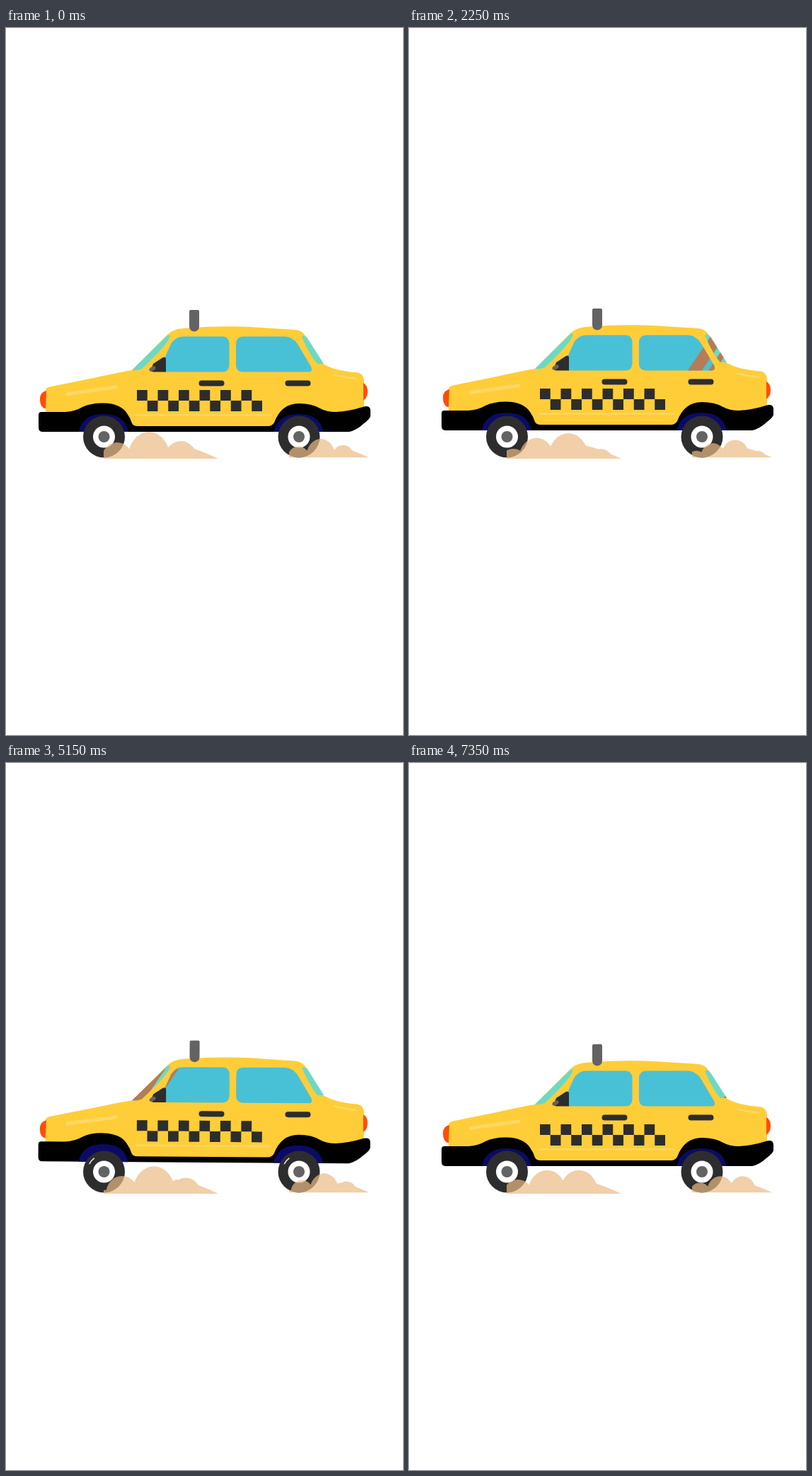
An HTML page for the animation above (7400 ms loop, 561 by 998 pixels).

```html
<!DOCTYPE html>
<html lang="en">
<head>
<meta charset="utf-8">
<title>Taxi</title>
<style>
  html, body { margin: 0; width: 100%; height: 100%; overflow: hidden; background: #fff; }
  svg { display: block; width: 100%; height: 100%; }
</style>
</head>
<body>
<svg viewBox="0 0 561 998">
  <defs>
    <path id="front" d="M178 483L227 435Q233 431 231 437Q226 449 192 481Q185 484 178 483Z"/>
    <path id="back" d="M418 436Q422 432 426 438L449 474L440 474Q430 463 418 436Z"/>
    <path id="panes" d="M250 435.500H306Q315.500 436 315.500 446V476Q315 485.500 306 485.500H224Q218 485 221 473L233 446Q239 436 250 435.500Z
      M335 435.500H394Q405 436 412 446L431 478Q434 485.500 428 485.500H335Q325 485 325 476V446Q325 436 335 435.500Z"/>
    <clipPath id="glass"><use href="#front"/><use href="#back"/><use href="#panes"/></clipPath>
    <g id="wheel">
      <circle r="29.500" fill="#2d2d2d"/>
      <circle r="15.500" fill="#fff"/>
      <circle r="8" fill="#636363"/>
    </g>
    <path id="arch" d="M103 570Q108 545 138 545Q168 545 173 570Z" fill="#0b0b66"/>
    <clipPath id="ground"><path d="M138 500H320V608H138Z"/></clipPath>
  </defs>

  <g id="car">
    <path fill="#ffcd38" d="M56 511Q57 507.500 62 506.500L124 494Q160 486 178 483L228 433Q236 425 250 424Q300 420 345 422L409 426Q419 427 424 436L448 474Q464 484 497 486.500Q505 488 506 498V550H440V566H110V550H56Z"/>
    <g fill="none" stroke="#ffd764" stroke-linecap="round">
      <path stroke-width="5" d="M87 516.500L155 507"/>
      <path stroke-width="2.500" d="M184 546.500H374"/>
      <path stroke-width="2.500" d="M464 489.500Q478 493 495 495"/>
    </g>
    <path fill="#ff4d05" d="M57 512Q48 514 48 524Q48 536 56 537.500ZM505 501Q511 504 511 513Q511 522 505 526Z"/>
    <path d="M46 546Q46 542 50 542H84Q98 541 108 535Q121 529 138 529.500Q162 530 171 544Q176 551 178 558Q180 562 186 562H370Q376 562 379 557Q389 530 414 530Q432 530 444 537Q453 542 466 542Q485 541 504 535Q514 532 515 539V548Q514 552 506 558Q495 568 485 570H52Q46 570 46 564Z"/>
    <use href="#arch"/>
    <use href="#arch" x="275.500"/>
    <use href="#front" fill="#6bd9c6"/>
    <use href="#back" fill="#6bd9c6"/>
    <use href="#panes" fill="#48c1d7"/>
    <g clip-path="url(#glass)">
      <path id="shine" fill="#b57c58" d="M0 432H20L-20 492H-40ZM29 432H38.500L-1.500 492H-11Z"/>
    </g>
    <path fill="#2d2d2d" d="M205 482L208 474L221 465.500Q226 463 226 468V485.500H208Q204 485 205 482Z"/>
    <ellipse cx="207" cy="481" rx="5" ry="2.800" fill="#636363" transform="rotate(-30 207 481)"/>
    <path id="checks" fill="#2d2d2d"/>
    <path stroke="#2d2d2d" stroke-width="8" stroke-linecap="round" d="M276.500 501.500H304.500M398.500 501.500H426.500"/>
    <path fill="#636363" d="M259 400Q259 398 261 398H271Q273 398 273 400V421Q273 428 266 428.500Q259 428 259 421Z"/>
  </g>

  <use href="#wheel" x="138.500" y="577"/>
  <use href="#wheel" x="414" y="577"/>
  <path id="glint" fill="none" stroke="#e4e4e4" stroke-width="1.600" stroke-linecap="round"/>
  <g fill="#eabb85" fill-opacity=".7">
    <g clip-path="url(#ground)"><path class="dust"/></g>
    <g transform="translate(400 606.500) scale(.7) translate(-138 -608)">
      <g clip-path="url(#ground)"><path class="dust"/></g>
    </g>
  </g>
</svg>
<script>
const LOOP = 7400, STEP = 70, CYCLE = 53 / 3, BOB = CYCLE / 2;
const $ = id => document.getElementById(id);
const dust = document.querySelectorAll('.dust');
const smooth = x => { x = Math.min(1, Math.max(0, x)); return x * x * (3 - 2 * x); };

let cells = '';
for (let i = 0; i < 12; i++) cells += `M${185 + i * 14.75} ${511 + i % 2 * 15}h14.750v15h-14.750z`;
$('checks').setAttribute('d', cells);

// Linear interpolation through [x, y] points
function curve(points, x) {
  let i = 1;
  while (i < points.length - 1 && x > points[i][0]) i++;
  const [x0, y0] = points[i - 1], [x1, y1] = points[i];
  return y0 + (y1 - y0) * (x - x0) / (x1 - x0);
}

const PUFF = [[-1, 0], [-.7, 10], [0, 23], [.3, 27], [.8, 32], [1, 38], [1.2, 39], [1.5, 36], [1.87, 33], [2, 25], [2.3, 20], [3, 0]];

function dustPath(u) {
  const shift = u ** 1.4;
  let d = 'M205 608L240 588Q262 590 300 608Z';
  for (let k = -1; k < 3; k++) {
    const s = k + shift, h = Math.max(.1, curve(PUFF, s));
    const x = 157 + s * (s < 0 ? 20 : 45), r = 9 + h * .55;
    d += `M${x - r} 608A${r} ${h} 0 0 1 ${x + r} 608Z`;
  }
  return d;
}

function arc(cx, from, to) {
  const at = deg => {
    const a = deg * Math.PI / 180;
    return `${cx + 23.5 * Math.cos(a)} ${577 + 23.5 * Math.sin(a)}`;
  };
  return `M${at(from)}A23.500 23.500 0 ${to - from > 180 ? 1 : 0} 1 ${at(to)}`;
}

const HEAD = [[1.8, 212], [2.33, 233], [3.33, 272], [4, 370], [7.67, 650], [11, 930]];
const SPAN = [[1.8, 2], [2.33, 24], [3.33, 42], [4, 58], [7.67, 125], [11, 2]];

function glints(p) {
  if (p < 1.8 || p > 11) return '';
  const head = curve(HEAD, p), tail = head - curve(SPAN, p);
  let d = '';
  for (const cx of [138.5, 414]) {
    d += arc(cx, tail, head);
    if (p > 5) d += arc(cx, tail + 180, head + 180);
  }
  return d;
}

function draw(now) {
  const t = now % LOOP;
  const frame = Math.floor(Math.floor(t / 50) * 50 / STEP);
  const p = frame % CYCLE, q = frame % BOB;

  const kick = 2.5 * Math.exp(-(((p - 1.33) / .25) ** 2));
  const lift = (q < 1.8 ? 6.3 * smooth(q / 1.5) : 6.3 - 5.3 * smooth((q - 1.8) / 5.2)) + kick;
  const tilt = p < 1.33 ? .6 * smooth(p / 1.33) : .6 * Math.max(0, (4 - p) / 2.67);
  $('car').setAttribute('transform', `translate(0 ${-lift}) rotate(${tilt} 280 500)`);
  $('shine').setAttribute('transform', `translate(${166 + 18.4 * p} 0)`);
  $('glint').setAttribute('d', glints(p));
  const d = dustPath(q / BOB);
  dust.forEach(el => el.setAttribute('d', d));
}

const start = performance.now();
function tick() {
  draw(performance.now() - start);
  requestAnimationFrame(tick);
}
tick();
</script>
</body>
</html>
```
